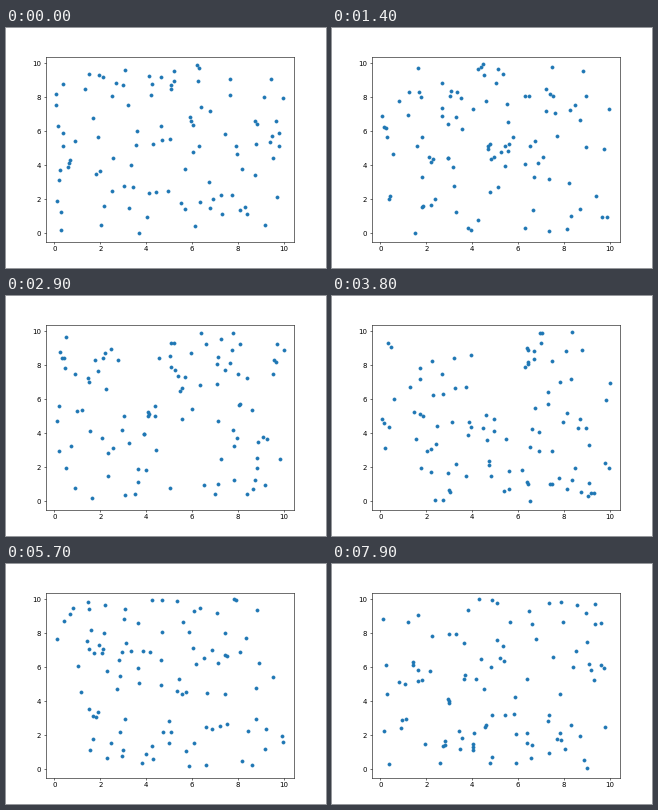
Recreate the animation shown at these times as a matplotlib script. Size 320 by 240 pixels, loop 8000 ms.

```python
import matplotlib.pyplot as plt
import numpy as np
from matplotlib.animation import FuncAnimation

FRAMES = 80
INTERVAL = 100  # ms
COUNT = 100
SEED = 7

plt.rcParams["font.family"] = "DejaVu Sans"


def cloud(frame):
    """Fresh uniform points in the 10 x 10 square, fixed for each frame."""
    return np.random.default_rng([SEED, frame]).uniform(0, 10, (COUNT, 2))


fig, ax = plt.subplots(figsize=(6.4, 4.8), dpi=50)
dots = ax.scatter(*cloud(0).T, s=20, color="tab:blue")
ax.set(xlim=(-0.37, 10.44), ylim=(-0.49, 10.37))
ax.set_xticks(range(0, 11, 2))
ax.set_yticks(range(0, 11, 2))


def update(frame):
    dots.set_offsets(cloud(frame))
    return (dots,)


anim = FuncAnimation(fig, update, frames=FRAMES, interval=INTERVAL,
                     repeat=True, repeat_delay=0, blit=False)
plt.show()
```
